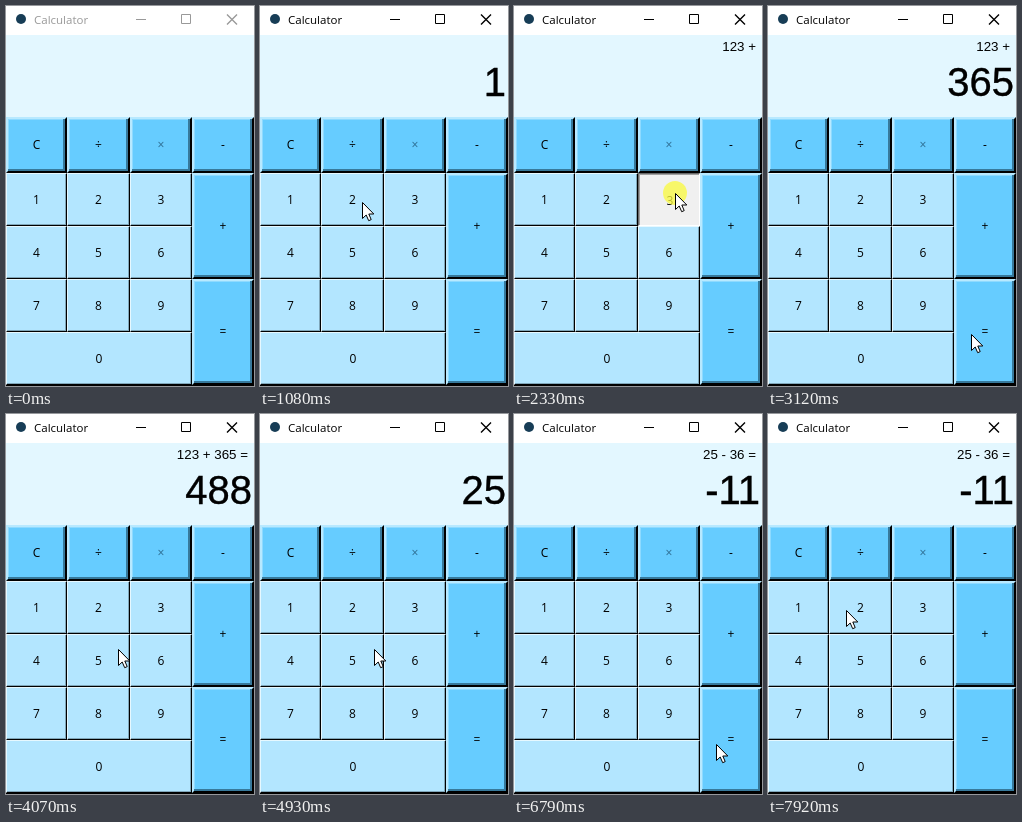
An HTML page that plays this animation: 248x380 px, repeating every 7990 ms.

```html
<!DOCTYPE html>
<html lang="en">
<head>
<meta charset="utf-8">
<title>Calculator</title>
<style>
  html, body { margin: 0; width: 100%; height: 100%; overflow: hidden; background: #fff; }
  #app { position: absolute; left: 0; top: 0; width: 248px; height: 380px; overflow: hidden;
    background: #000; font: 12px/1 "Open Sans", "Noto Sans", sans-serif; color: #000; cursor: default; }
  #bar { position: absolute; left: 0; top: 0; width: 248px; height: 29px; background: #fff; color: #999; }
  #bar.active { color: #000; }
  #bar span { position: absolute; left: 28px; top: 8px; font-size: 11.5px; }
  #bar i { position: absolute; left: 10px; top: 8px; width: 10px; height: 10px; border-radius: 50%; background: #173d56; }
  #bar svg { position: absolute; left: 0; top: 0; }
  #screen { position: absolute; left: 0; top: 29px; width: 248px; height: 82px; background: #e3f7ff;
    font-family: "Liberation Sans", Arial, sans-serif; color: #000; }
  #sub, #num { position: absolute; white-space: pre; line-height: 1; }
  #sub { right: 6px; top: 5px; font-size: 13.33px; }
  #num { right: 2px; top: 27px; font-size: 40px; -webkit-text-stroke: .4px; }
  .key { position: absolute; box-sizing: border-box; display: flex; align-items: center; justify-content: center;
    background: #b3e6ff; border: 1px solid; border-color: #e6f8ff #000 #000 #e6f8ff;
    box-shadow: inset -1px -1px #7fa6b9; }
  .key.op { background: #66ccff; border-width: 2px; border-color: #b8e9ff #000 #000 #b8e9ff;
    box-shadow: inset -2px -2px #37799b, inset 1px 1px #8edaff; }
  .key.down { background: #f0f0f0; border-color: #696969 #fff #fff #696969; box-shadow: inset 1px 1px #a0a0a0; }
  .key.down b { transform: translate(1px, 1px); }
  .key b { font-weight: 400; }
  .key.faint { color: #2f6f94; }
  #pointer { position: absolute; left: 0; top: 0; overflow: visible; }
</style>
</head>
<body>
<div id="app">
  <div id="bar">
    <i></i><span>Calculator</span>
    <svg width="248" height="29" fill="none" stroke="currentColor">
      <path d="M130 13.5h10M175.5 8.5h9v9h-9z"/>
      <path d="M221 8.5l10 10M231 8.5l-10 10" stroke-width="1.4"/>
    </svg>
  </div>
  <div id="screen"><div id="sub"></div><div id="num"></div></div>
  <svg id="pointer" width="1" height="1">
    <circle id="spot" r="12" fill="#fafa3c" fill-opacity=".75"/>
    <path d="M.5.5V16.5L4.2 13 6.7 18.7 9.2 17.6 6.8 12H11.8Z" fill="#fff" stroke="#000"/>
  </svg>
</div>
<script>
const LOOP = 7990, PRESS = 70, GLOW = 140;
const $ = id => document.getElementById(id);
const app = $('app'), bar = $('bar'), sub = $('sub'), num = $('num'), pointer = $('pointer'), spot = $('spot');

// Keys sit on a grid of column and row edges.
const cols = [0, 61, 124, 186, 248], rows = [111, 167, 220, 273, 326, 379];
const keys = {};
function addKey(label, c, r, w = 1, h = 1) {
  const el = document.createElement('div');
  el.className = /\d/.test(label) ? 'key' : 'key op';
  el.innerHTML = `<b>${label}</b>`;
  Object.assign(el.style, {
    left: cols[c] + 'px', top: rows[r] + 'px',
    width: cols[c + w] - cols[c] + 'px', height: rows[r + h] - rows[r] + 'px'
  });
  app.insertBefore(el, pointer);
  keys[label] = el;
}
[...'C÷×-'].forEach((label, i) => addKey(label, i, 0));
[...'123456789'].forEach((label, i) => addKey(label, i % 3, 1 + Math.floor(i / 3)));
addKey('0', 0, 4, 3);
addKey('+', 3, 1, 1, 2);
addKey('=', 3, 3, 1, 2);
keys['×'].classList.add('faint');

// time, key, upper line and number shown on release
const clicks = [
  [810, '1', '', '1'], [1150, '2', '', '12'], [1420, '3', '', '123'],
  [1830, '+', '123 +', ''],
  [2330, '3', '123 +', '3'], [2590, '6', '123 +', '36'], [2800, '5', '123 +', '365'],
  [3440, '=', '123 + 365 =', '488'],
  [4530, '2', '', '2'], [4790, '5', '', '25'],
  [5360, '-', '25 -', ''],
  [5780, '3', '25 -', '3'], [6180, '6', '25 -', '36'],
  [6650, '=', '25 - 36 =', '-11']
];

// start, end, x, y
const moves = [
  [70, 470, 22, 205], [950, 1080, 102, 196], [1290, 1360, 160, 193],
  [1560, 1690, 208, 215], [1970, 2180, 161, 187], [2450, 2520, 152, 240],
  [2660, 2730, 96, 240], [2870, 3120, 203, 328], [3850, 4200, 82, 204],
  [4670, 4730, 92, 243], [4900, 4930, 114, 235], [4990, 5290, 208, 140],
  [5500, 5710, 160, 190], [5960, 6100, 152, 244], [6320, 6530, 202, 330],
  [7250, 7700, 90, 187], [7770, 7920, 78, 196]
];

// The pointer advances in steps of about 70 ms.
function pointerAt(t) {
  let x = 195, y = 366;
  for (const [start, end, tx, ty] of moves) {
    if (t < start) break;
    const n = Math.max(1, Math.round((end - start) / 70));
    const p = Math.min(1, (Math.floor(n * (t - start) / (end - start)) + 1) / (n + 1));
    const e = (1 - Math.cos(Math.PI * p)) / 2;
    x += (tx - x) * e;
    y += (ty - y) * e;
  }
  return [Math.round(x), Math.round(y)];
}

function draw(t) {
  let upper = '', value = '', held = '', glow = false;
  for (const [at, key, line, shown] of clicks) {
    if (t < at) break;
    glow = t < at + GLOW;
    if (t < at + PRESS) held = key;
    else [upper, value] = [line, shown];
  }
  const [x, y] = pointerAt(t);
  sub.textContent = upper;
  num.textContent = value;
  bar.classList.toggle('active', t >= clicks[0][0]);
  for (const label in keys) keys[label].classList.toggle('down', label === held);
  pointer.style.transform = `translate(${x}px, ${y}px)`;
  pointer.style.visibility = t < moves[0][0] ? 'hidden' : 'visible';
  spot.style.display = glow ? '' : 'none';
}

const began = performance.now();
function tick() {
  draw((performance.now() - began) % LOOP);
  requestAnimationFrame(tick);
}
tick();
</script>
</body>
</html>
```
